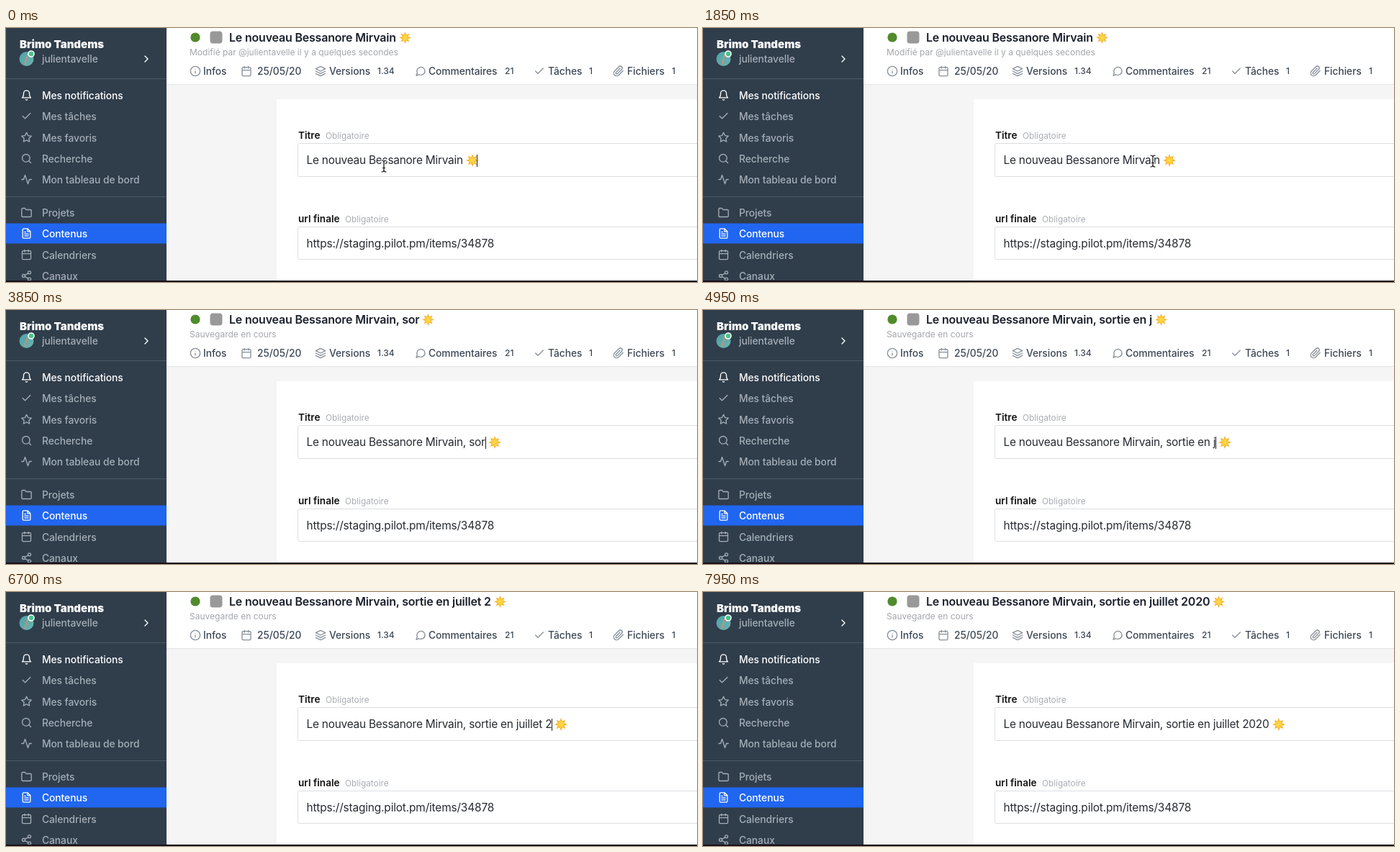
An HTML page that plays this animation: 960x353 px, repeating every 8000 ms.

```html
<!DOCTYPE html>
<html lang="fr">
<head>
<meta charset="utf-8">
<title>Contenus</title>
<style>
html, body { margin: 0; width: 100%; height: 100%; overflow: hidden; background: #fff; }
#stage { position: absolute; left: 0; top: 0; width: 960px; height: 353px; overflow: hidden; font-family: Inter, sans-serif; }
#stage > svg { position: absolute; left: 0; top: 0; }
.line { position: absolute; height: 20px; line-height: 20px; white-space: pre; }
#title { left: 310px; top: 3px; width: 640px; font-size: 16px; font-weight: 600; letter-spacing: -.2px; color: #1a202c; white-space: normal; }
#field { left: 417.5px; top: 174px; font-size: 15.4px; letter-spacing: -.23px; color: #262b31; }
.sun { width: 18px; height: 18px; vertical-align: -4px; overflow: visible; }
#title .sun { width: 17px; height: 17px; vertical-align: -3px; }
.caret { display: inline-block; width: 0; height: 17px; vertical-align: -4px; position: relative; }
.caret::after { content: ""; position: absolute; left: 0; top: 0; width: 1px; height: 17px; background: #222; }
#caretEnd { margin-left: -3px; }
.nav, .tab { font-size: 13.8px; font-weight: 500; letter-spacing: -.05px; }
.tab { fill: #3d4855; }
.badge { font-size: 12px; font-weight: 500; fill: #3d4855; }
.label { font-size: 13.6px; font-weight: 600; fill: #111; }
.hint { font-size: 11.8px; fill: #a9adb3; }
.status { font-size: 12px; fill: #a3a6ab; }
.icon { fill: none; stroke-linecap: round; stroke-linejoin: round; stroke-width: 2; }
</style>
</head>
<body>
<div id="stage">
  <svg id="scene" width="960" height="353" viewBox="0 0 960 353">
    <defs>
      <linearGradient id="avatar" x2="1" y2="1">
        <stop stop-color="#4aa3a8"/><stop offset="1" stop-color="#6fb3b0"/>
      </linearGradient>
      <radialGradient id="disc">
        <stop stop-color="#ffdc52"/><stop offset="1" stop-color="#fcc433"/>
      </radialGradient>
      <symbol id="sun" viewBox="-9 -9 18 18">
        <path id="rays" fill="#f6a723"/>
        <circle r="5.4" fill="url(#disc)"/>
      </symbol>
    </defs>
    <rect width="960" height="353" fill="#f5f5f5"/>
    <rect x="223" width="737" height="78" fill="#fff"/>
    <rect x="223" y="78" width="737" height="1" fill="#e3e4e6"/>
    <rect x="376" y="99" width="584" height="254" fill="#fff"/>
    <g fill="#fff" stroke="#dcdee0">
      <rect x="405.5" y="160.5" width="570" height="46" rx="2"/>
      <rect x="405.5" y="276.5" width="570" height="45" rx="2"/>
    </g>
    <rect width="223" height="353" fill="#303d4b"/>
    <path d="M0 70.5H223M0 234.5H223" stroke="#4b5866"/>
    <rect y="271.5" width="223" height="28" fill="#2066f1"/>
    <circle cx="28.5" cy="43" r="10" fill="url(#avatar)"/>
    <path d="M31 35L26 51" stroke="#c5917d" stroke-width="2"/>
    <circle cx="35" cy="36" r="4" fill="#42c78a" stroke="#fff" stroke-width="1.6"/>
    <circle cx="263" cy="13" r="6.6" fill="#508b2c"/>
    <rect x="283.5" y="4.5" width="17" height="17" rx="4" fill="#999"/>
    <g id="content"></g>
    <rect y="351" width="960" height="2" fill="#170f18"/>
  </svg>
  <div id="title" class="line"><span id="titleText"></span> <svg class="sun"><use href="#sun"/></svg></div>
  <div id="field" class="line"><span id="fieldText"></span><i id="caret" class="caret"></i> <svg class="sun"><use href="#sun"/></svg><i id="caretEnd" class="caret"></i></div>
  <svg width="960" height="353" style="pointer-events:none">
    <g id="mouse" fill="none" stroke-linecap="round">
      <path d="M-3-8Q0-8 0-5.5Q0-8 3-8M0-6V6M-3 8Q0 8 0 5.5Q0 8 3 8M-1.5 2.5H1.5" stroke="#fff" stroke-width="3"/>
      <path d="M-3-8Q0-8 0-5.5Q0-8 3-8M0-6V6M-3 8Q0 8 0 5.5Q0 8 3 8M-1.5 2.5H1.5" stroke="#111" stroke-width="1.2"/>
    </g>
  </svg>
</div>
<script>
const $ = id => document.getElementById(id);
const USER = 'julientavelle';
const BASE = 'Le nouveau Bessanore Mirvain';
const TYPED = ', sortie en juillet 2020';
const KEY_TIMES = [2850, 3050, 3450, 3600, 3750, 3950, 4080, 4200, 4330, 4470, 4600, 4720,
  4880, 5100, 5280, 5480, 5650, 5850, 6030, 6300, 6600, 6850, 7050, 7250];
const CLICK = 2300, BLINK = 530, LOOP = 8000;

// 24-unit line icons
const ICONS = {
  bell: 'M18 8A6 6 0 0 0 6 8c0 7-3 9-3 9h18s-3-2-3-9M13.7 21a2 2 0 0 1-3.4 0',
  check: 'M20 6L9 17l-5-5',
  star: 'M12 2l3.1 6.3 6.9 1-5 4.8 1.2 6.9-6.2-3.2L5.8 21 7 14.1 2 9.3l6.9-1z',
  search: 'M3 11a8 8 0 1 0 16 0a8 8 0 1 0-16 0M21 21l-4.4-4.4',
  activity: 'M22 12h-4l-3 9L9 3l-3 9H2',
  folder: 'M22 19a2 2 0 0 1-2 2H4a2 2 0 0 1-2-2V5a2 2 0 0 1 2-2h5l2 3h9a2 2 0 0 1 2 2z',
  file: 'M14 2H6a2 2 0 0 0-2 2v16a2 2 0 0 0 2 2h12a2 2 0 0 0 2-2V8zv6h6M16 13H8M16 17H8M10 9H8',
  calendar: 'M5 4h14a2 2 0 0 1 2 2v14a2 2 0 0 1-2 2H5a2 2 0 0 1-2-2V6a2 2 0 0 1 2-2zM16 2v4M8 2v4M3 10h18',
  share: 'M15 5a3 3 0 1 0 6 0a3 3 0 1 0-6 0M3 12a3 3 0 1 0 6 0a3 3 0 1 0-6 0M15 19a3 3 0 1 0 6 0a3 3 0 1 0-6 0M8.6 13.5l6.8 4M15.4 6.5l-6.8 4',
  info: 'M2 12a10 10 0 1 0 20 0a10 10 0 1 0-20 0M12 16v-4M12 8v0',
  layers: 'M12 2L2 7l10 5 10-5zM2 17l10 5 10-5M2 12l10 5 10-5',
  message: 'M21 11.5a8.4 8.4 0 0 1-12.3 7.6L3 21l1.9-5.7A8.4 8.4 0 1 1 21 11.5z',
  clip: 'M21.4 11l-9.2 9.2a6 6 0 0 1-8.5-8.5l9.2-9.2a4 4 0 0 1 5.7 5.7l-9.2 9.2a2 2 0 0 1-2.8-2.8l8.5-8.5',
  chevron: 'M9 18l6-6-6-6'
};

const icon = (name, x, y, color) =>
  `<path class="icon" d="${ICONS[name]}" stroke="${color}" transform="translate(${x - 8} ${y - 8}) scale(.667)"/>`;
const text = (cls, x, y, str, extra = '') => `<text class="${cls}" x="${x}" y="${y}" ${extra}>${str}</text>`;

const MUTED = '#a5aeb8', TAB_ICON = '#87909a';
const nav = [
  ['bell', 94, 'Mes notifications', '#fff'], ['check', 123, 'Mes tâches'], ['star', 152.5, 'Mes favoris'],
  ['search', 182, 'Recherche'], ['activity', 211, 'Mon tableau de bord'], ['folder', 257, 'Projets'],
  ['file', 286, 'Contenus', '#fff'], ['calendar', 315.5, 'Calendriers'], ['share', 345, 'Canaux']
];
const tabs = [
  ['info', 263, 274, 'Infos'], ['calendar', 334, 349, '25/05/20'], ['layers', 437, 449, 'Versions', 516, '1.34'],
  ['message', 576, 587, 'Commentaires', 693, '21'], ['check', 741, 753, 'Tâches', 810, '1'],
  ['clip', 851, 863, 'Fichiers', 925, '1']
];

$('content').innerHTML =
  text('brand', 19, 28.4, 'Brimo Tandems', 'font-size="15" font-weight="900" fill="#fff"') +
  text('nav', 50, 48, USER, `fill="${MUTED}"`) + icon('chevron', 195, 43, '#fff') +
  nav.map(([name, y, label, color = MUTED]) =>
    icon(name, 28.5, y - .5, color) + text('nav', 50, y + 5, label, `fill="${color}"`)).join('') +
  tabs.map(([name, ix, x, label, bx, badge]) =>
    icon(name, ix, 60, TAB_ICON) + text('tab', x, 65, label) + (badge ? text('badge', bx, 64, badge) : '')).join('') +
  text('status', 255, 38.3, '', 'id="status"') +
  text('label', 406, 154, 'Titre') + text('hint', 444, 153.5, 'Obligatoire') +
  text('label', 406, 270, 'url finale') + text('hint', 471, 269.5, 'Obligatoire') +
  text('url', 417.5, 305, 'https://staging.pilot.pm/items/34878',
    'font-size="15.4" letter-spacing="-.15" fill="#262b31"');

$('rays').setAttribute('d', 'M' + Array.from({ length: 16 }, (_, i) => {
  const r = i % 2 ? 4.4 : 9, a = i * Math.PI / 8;
  return `${(r * Math.cos(a)).toFixed(2)} ${(r * Math.sin(a)).toFixed(2)}`;
}).join('L') + 'z');

const ease = (t, from, to) => {
  const p = Math.min(1, Math.max(0, (t - from) / (to - from)));
  return p * p * (3 - 2 * p);
};
const show = (el, on) => { el.style.visibility = on ? 'visible' : 'hidden'; };

function render(t) {
  const count = KEY_TIMES.filter(k => k <= t).length;
  const value = BASE + TYPED.slice(0, count);
  $('titleText').textContent = value;
  $('fieldText').textContent = value;
  $('status').textContent = count ? 'Sauvegarde en cours' : `Modifié par @${USER} il y a quelques secondes`;

  const clicked = t >= CLICK;
  const lastInput = count ? KEY_TIMES[count - 1] : clicked ? CLICK : 0;
  const lit = Math.floor((t - lastInput) / BLINK) % 2 === 0;
  show($('caret'), clicked && lit);
  show($('caretEnd'), !clicked && lit);

  const glide = ease(t, 600, 1750), nudge = ease(t, 1870, 2150);
  $('mouse').setAttribute('transform', `translate(${525 + 100 * glide + 9 * nudge} ${192 - 7 * glide})`);
  show($('mouse'), !count);
}

const start = performance.now();
function tick() {
  render((performance.now() - start) % LOOP);
  requestAnimationFrame(tick);
}
tick();
</script>
</body>
</html>
```
